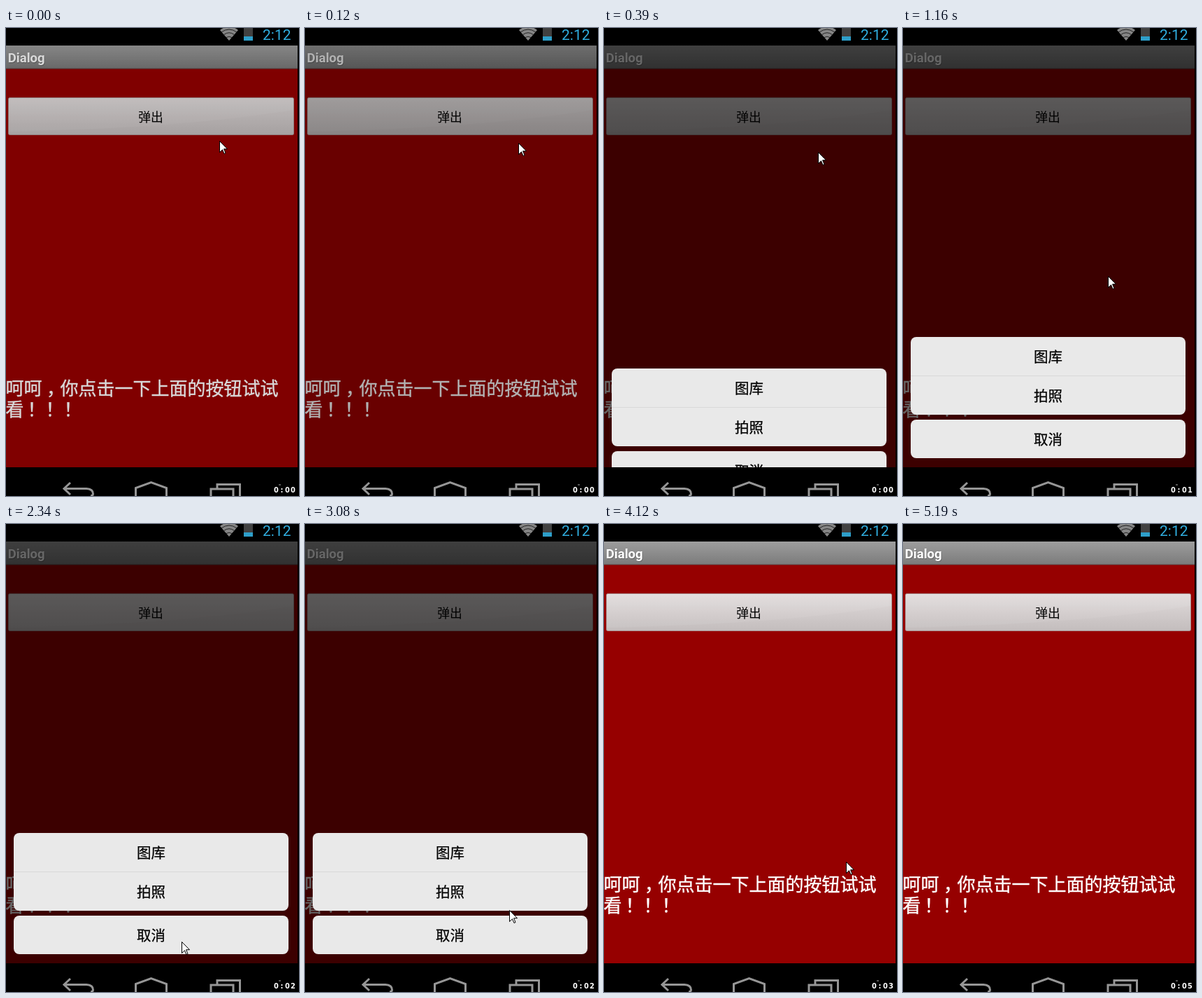
Write an HTML page that moves like this. It is 419 by 668 pixels and loops after 5330 ms.

```html
<!DOCTYPE html>
<html lang="zh-CN">
<head>
<meta charset="utf-8">
<title>Dialog</title>
<style>
html, body { margin: 0; width: 100%; height: 100%; overflow: hidden; background: #000; }
svg { display: block; width: 419px; height: 668px; }
.cjk { font-family: "Noto Sans CJK SC", "Noto Sans CJK", sans-serif; }
.hint { font-size: 26px; fill: #fff; stroke: #fff; stroke-width: .4; }
.wide { font-family: "Noto Sans CJK TC", "Noto Sans CJK", sans-serif; }
.item { font-size: 20.5px; text-anchor: middle; stroke: #000; stroke-width: .25; }
.nav { fill: none; stroke: #969696; stroke-width: 3; }
</style>
</head>
<body>
<svg viewBox="0 0 419 668" xmlns="http://www.w3.org/2000/svg">
  <defs>
    <linearGradient id="bar" x2="0" y2="1">
      <stop offset="0" stop-color="#9d9d9d"/>
      <stop offset="1" stop-color="#7b7b7b"/>
    </linearGradient>
    <linearGradient id="btn" x2="0" y2="1">
      <stop offset="0" stop-color="#e2dddd"/>
      <stop offset=".5" stop-color="#d2cccc"/>
      <stop offset="1" stop-color="#c3bdbd"/>
    </linearGradient>
    <clipPath id="screen"><path d="M0 25H417V627H0Z"/></clipPath>
  </defs>
  <path d="M0 0H419V668H0Z"/>

  <g id="status">
    <path d="M306 3Q319 -7 332 3L319 18Z" fill="#858585"/>
    <path d="M308 6Q319 -2 330 6M311.5 9.500Q319 4 326.5 9.500M315 13.500Q319 11 323 13.500" fill="none" stroke="#222"/>
    <path d="M340 0H353V18H340Z" fill="#414141"/>
    <path d="M340 12H353V18H340Z" fill="#2e9fca"/>
    <text x="367" y="17" font-family="Roboto, sans-serif" font-size="21" fill="#30aee0">2:12</text>
  </g>

  <g clip-path="url(#screen)">
    <path d="M0 25H417V628H0Z" fill="#960000"/>
    <path d="M0 25H417V58H0Z" fill="url(#bar)"/>
    <path d="M0 58H417" stroke="#5c4a4a"/>
    <g font-family="Roboto, sans-serif" font-size="18.500" font-weight="700">
      <text x="3.500" y="50" fill="#444" opacity=".5">Dialog</text>
      <text x="2.800" y="49" fill="#fff">Dialog</text>
    </g>
    <rect x="3.500" y="99.500" width="408" height="53" rx="2" fill="url(#btn)" stroke="#a88e8e"/>
    <path d="M4 148Q250 143 411 117V100H4Z" fill="#fff" opacity=".06"/>
    <text class="cjk" x="207" y="133.500" font-size="17.800" text-anchor="middle">弹出</text>
    <g class="cjk hint">
      <text x="-.5" y="523.500">呵呵</text>
      <text x="58" y="523.500">，</text>
      <text x="77.500" y="523.500">你点击一下上面的按钮试试</text>
      <text x="-.5" y="554">看</text>
      <text class="wide" x="24" y="554" lang="zh-TW">！！！</text>
    </g>
    <path id="dim" d="M0 25H417V628H0Z"/>
    <g id="sheet" class="cjk">
      <rect x="11" width="393" height="111" rx="8" fill="#e9e9e9"/>
      <path d="M11 55.500H404" stroke="#d9d9d9"/>
      <rect id="cancel" x="11" y="118" width="393" height="55" rx="8"/>
      <text class="item" x="207.500" y="36">图库</text>
      <text class="item" x="207.500" y="92">拍照</text>
      <text class="item" x="207.500" y="154">取消</text>
    </g>
  </g>

  <path class="nav" d="M92 649L83 657.500L92 666M83 657.500H115Q124.500 658 124.500 665Q124 668 121 668"/>
  <path class="nav" d="M185.500 670V656.500L207.500 648.500L229.500 656.500V670"/>
  <path class="nav" d="M293 670V658H325V670M302 657V651.500H334.500V668"/>
  <path d="M390 651H393V653H390Z" fill="#555"/>
  <text id="timer" x="383 392.500 399 407" y="663" font-family="DejaVu Sans, sans-serif" font-weight="700" font-size="9.800" fill="#fff"></text>
  <path id="cursor" d="M.5 .5V16.500L4.500 12.700L7 18.500L9 17.500L6.600 11.700H11.500Z" fill="#fff" stroke="#000"/>
</svg>
<script>
const LOOP = 5330;
const STEP = 132, LEAD = 40;   // the screen refreshes once per step
const OPEN = 1, CLOSE = 28;    // steps at which the sheet starts to move
const SHEET_TOP = 441, SHEET_TRAVEL = 187;

// Turning points of the pointer: [step, x, y].
const path = [[0, 305, 161], [2, 305, 166], [6, 309, 211], [9, 293, 354], [10, 293, 354],
  [12, 316, 362], [13, 273, 514], [16, 241, 639], [18, 251, 596], [21, 268, 484],
  [23, 292, 551], [25, 294, 569], [29, 328, 487], [30, 344, 471], [33, 351, 504],
  [36, 358, 656], [37, 358, 690]];

const $ = id => document.getElementById(id);
const clamp = v => Math.max(0, Math.min(1, v));
const move = (el, x, y) => el.setAttribute('transform', `translate(${Math.round(x)} ${Math.round(y)})`);

function pointer(step) {
  const i = path.findIndex(p => p[0] > step);
  if (i < 0) return path[path.length - 1].slice(1);
  const [s0, x0, y0] = path[i - 1], [s1, x1, y1] = path[i];
  const p = (step - s0) / (s1 - s0);
  return [x0 + (x1 - x0) * p, y0 + (y1 - y0) * p];
}

function draw(ms) {
  const step = Math.floor((ms % LOOP + LEAD) / STEP);
  const rise = clamp((step - OPEN) / 2.63);
  const leave = clamp((step - CLOSE) / 2);
  const shown = rise - leave ** 1.52;
  const dim = .6 * clamp((step + 1) / 4) * (1 - leave ** 1.17);
  const pressed = step >= 20 && step < 22;

  $('dim').setAttribute('opacity', dim);
  move($('sheet'), 0, SHEET_TOP + SHEET_TRAVEL * (1 - shown));
  $('cancel').setAttribute('fill', pressed ? '#d4d4d4' : '#e9e9e9');
  move($('cursor'), ...pointer(step));
  $('timer').textContent = '0:0' + Math.floor(step / 7.79);
}

const start = performance.now();
function frame() {
  draw(performance.now() - start);
  requestAnimationFrame(frame);
}
frame();
</script>
</body>
</html>
```
